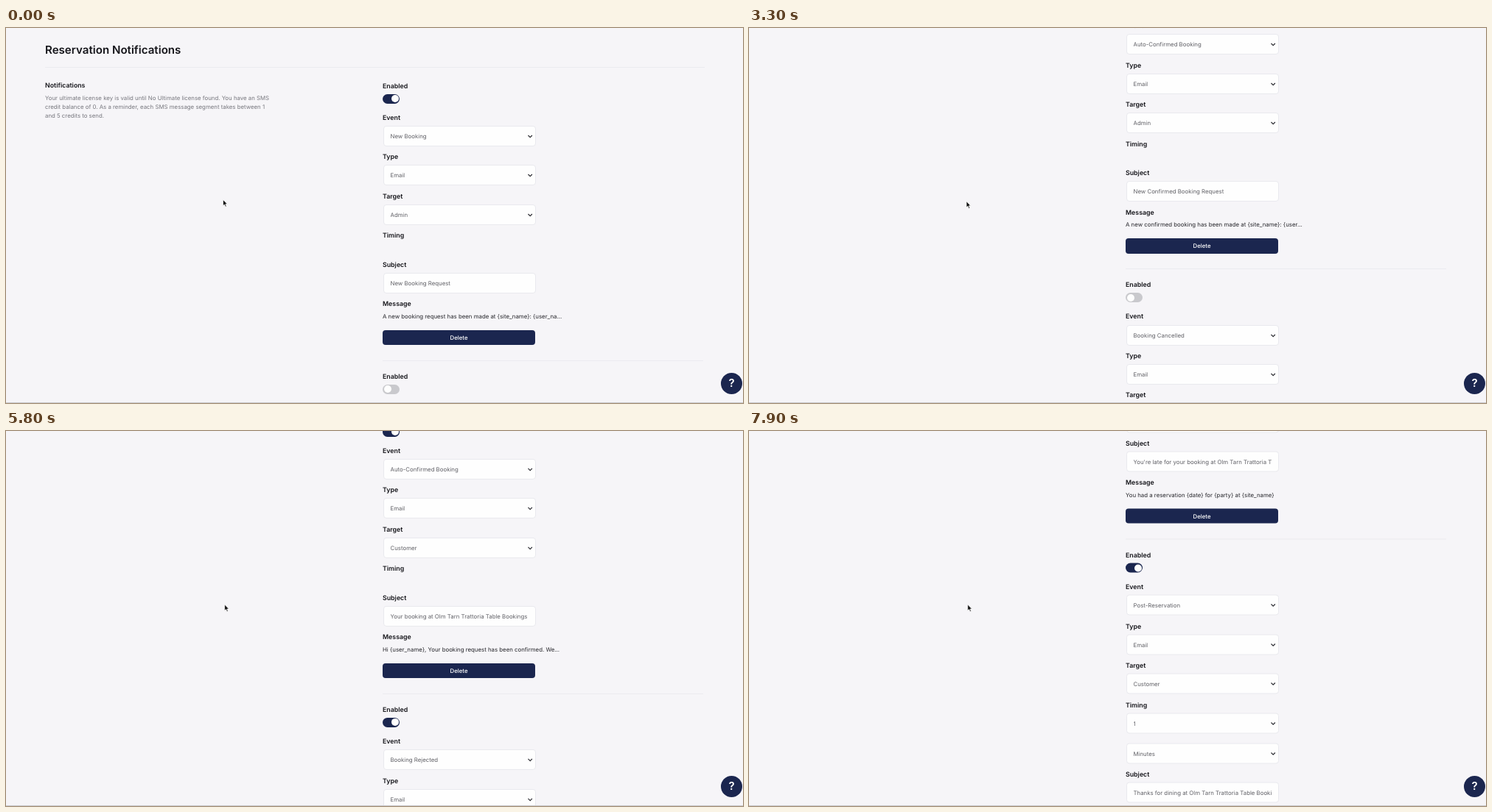
An HTML page for the animation above (8000 ms loop, 1000x510 px).

```html
<!DOCTYPE html>
<html lang="en">
<head>
<meta charset="utf-8">
<title>Notification settings</title>
<style>
  html, body { margin: 0; width: 100%; height: 100%; overflow: hidden; }
  body {
    position: relative; background: #f6f5f8;
    font: 400 7.84px Inter, sans-serif; text-rendering: geometricPrecision;
  }
  #page { position: absolute; left: 0; top: 0; width: 1000px; }
  #page div, #help, #edge, #cursor { position: absolute; box-sizing: border-box; white-space: pre; }
  .title { font-size: 15.1px; font-weight: 600; line-height: 0; color: #15151a; }
  .label { font-size: 8.8px; font-weight: 600; line-height: 0; color: #15151a; margin-top: .7px; }
  .hint { line-height: 0; color: #77777e; }
  .text { line-height: 0; color: #27272c; }
  .rule { height: 1px; background: #ebebf0; }
  .field {
    width: 207px; height: 28px; padding: 0 9px; line-height: 26px; overflow: hidden;
    background: #fefefe; border: 1px solid #e9e9ee; border-radius: 4px; color: #606066;
  }
  .field span { display: block; overflow: hidden; }
  .field svg { position: absolute; left: 194px; top: 10px; }
  .delete {
    width: 207px; height: 20.5px; line-height: 20.5px; border-radius: 4px;
    background: #1b264f; color: #fff; font-weight: 500; text-align: center;
  }
  .toggle { width: 23px; height: 13px; border-radius: 7px; background: #c9c9cd; }
  .toggle i {
    position: absolute; left: 1.5px; top: 1.5px; width: 10px; height: 10px;
    border-radius: 50%; background: #fefefe;
  }
  .toggle.on { background: #1b264f; }
  .toggle.on i { left: 11.5px; }
  #help {
    left: 970px; top: 469px; width: 29px; height: 29px; border-radius: 50%;
    background: #1b264f; color: #fff; font-size: 15px; font-weight: 600;
    line-height: 28.5px; text-align: center;
  }
  #edge { left: 0; top: 509px; width: 1000px; height: 1px; background: #cbcbd0; }
  #cursor { left: 293px; top: 232px; }
</style>
</head>
<body>
<div id="page"></div>
<div id="help">?</div>
<div id="edge"></div>
<svg id="cursor" width="10" height="14" viewBox="0 0 10 14">
  <path d="M1.5 1.5V9.8L3.4 8.1L4.8 11.2L6.2 10.6L4.8 7.6H7.3Z" fill="#111" stroke="#fff" stroke-width=".7"/>
</svg>
<script>
const LOOP = 8000, STEP = 100;
const COL = 511, FIRST = 79, PITCH = 395.4, TIMING = 55;
const page = document.getElementById('page');
const cursor = document.getElementById('cursor');

const place = 'Olm Tarn Trattoria Table Bookings';
const yours = 'Your booking at ' + place;

// enabled, event, target, subject, message, timing
const notices = [
  [1, 'New Booking', 'Admin', 'New Booking Request',
    'A new booking request has been made at {site_name}: {user_na...'],
  [0, 'Auto-Confirmed Booking', 'Admin', 'New Confirmed Booking Request',
    'A new confirmed booking has been made at {site_name}: {user...'],
  [0, 'Booking Cancelled', 'Admin', 'Booking Request Cancelled',
    'A booking request has been cancelled at {site_name}: {user_...'],
  [1, 'New Booking', 'Customer', yours,
    'Thanks {user_name}, Your booking request is waiting to be c...'],
  [1, 'Booking Confirmed', 'Customer', yours,
    'Hi {user_name}, Your booking request has been confirmed. We...'],
  [1, 'Auto-Confirmed Booking', 'Customer', yours,
    'Hi {user_name}, Your booking request has been confirmed. We...'],
  [1, 'Booking Rejected', 'Customer', yours,
    'Hi {user_name}, Sorry, we could not accomodate your booking...'],
  [1, 'Reservation Reminder', 'Customer', 'Reminder: ' + yours,
    'You have a reservation {date} for {party} at {site_name}', ['1', 'Hours']],
  [1, 'Late for Reservation', 'Customer', "You're late for your booking at " + place,
    'You had a reservation {date} for {party} at {site_name}', ['1', 'Minutes']],
  [1, 'Post-Reservation', 'Customer', 'Thanks for dining at ' + place,
    'Thanks for visiting {site_name}, {user_name}', ['1', 'Minutes']]
];

function add(cls, x, y, html = '') {
  const el = document.createElement('div');
  el.className = cls;
  el.style.left = x + 'px';
  el.style.top = y + 'px';
  el.innerHTML = html;
  page.append(el);
  return el;
}

const chevron = '<svg width="8" height="7" viewBox="0 0 8 7">' +
  '<path d="M1.5 2L4.2 4.7L6.9 2" fill="none" stroke="#2e2e34" stroke-width="1.2"/></svg>';
const label = (y, s) => add('label', COL, y, s);
const input = (y, s) => add('field', COL + .5, y - 14, `<span>${s}</span>`);
const select = (y, s) => add('field', COL + .5, y - 14, `<span>${s}</span>${chevron}`);
const rule = (x, y, w) => { add('rule', x, y).style.width = w + 'px'; };

function addNotice(top, [on, event, target, subject, message, timing]) {
  label(top, 'Enabled');
  add(on ? 'toggle on' : 'toggle', COL, top + 10.5, '<i></i>');
  [['Event', event], ['Type', 'Email'], ['Target', target]].forEach(([name, value], i) => {
    label(top + 43 + i * 53.5, name);
    select(top + 67.7 + i * 53.4, value);
  });
  label(top + 203.5, 'Timing');
  let y = top;
  if (timing) {
    select(top + 228, timing[0]);
    select(top + 269.5, timing[1]);
    y += TIMING;
  }
  label(y + 243, 'Subject');
  input(y + 267.5, subject);
  label(y + 296.5, 'Message');
  add('text', COL, y + 312.5, message);
  add('delete', COL, y + 331.7, 'Delete');
  rule(COL, y + 373, 435);
  return y + PITCH;
}

add('title', 53, 29.5, 'Reservation Notifications');
rule(53, 53, 895);
add('label', 53, 78, 'Notifications');
[
  'Your ultimate license key is valid until No Ultimate license found. You have an SMS',
  'credit balance of 0. As a reminder, each SMS message segment takes between 1',
  'and 5 credits to send.'
].forEach((line, i) => add('hint', 53, 94.7 + i * 12.1, line));
notices.reduce(addNotice, FIRST);

// [time, value] points joined by a smooth monotone curve
function curve(points) {
  const slope = i => (points[i + 1][1] - points[i][1]) / (points[i + 1][0] - points[i][0]);
  const last = points.length - 1;
  const tangent = points.map((_, i) => {
    const a = slope(Math.max(i - 1, 0)), b = slope(Math.min(i, last - 1));
    return a * b > 0 ? 2 * a * b / (a + b) : 0;
  });
  return t => {
    if (t <= points[0][0]) return points[0][1];
    if (t >= points[last][0]) return points[last][1];
    const i = points.findIndex(p => p[0] > t) - 1;
    const [t0, v0] = points[i], [t1, v1] = points[i + 1];
    const d = t1 - t0, s = (t - t0) / d, r = 1 - s;
    return v0 * (1 + 2 * s) * r * r + v1 * s * s * (3 - 2 * s)
      + d * s * r * (tangent[i] * r - tangent[i + 1] * s);
  };
}

const scroll = curve([[1400, 0], [2300, 111], [3300, 520], [4400, 1137],
  [5200, 1612], [6400, 2549], [7900, 3578.5]]);
const driftX = curve([[2400, 0], [3300, .5], [4400, 2], [7900, 2.2]]);
const driftY = curve([[2400, 0], [3300, 2.2], [4400, 3], [5200, 2.5], [7900, 2.5]]);

function draw() {
  // the small offset keeps a clock just short of a step from lagging behind
  const t = Math.floor((performance.now() + 2) % LOOP / STEP) * STEP;
  page.style.transform = `translateY(${-scroll(t).toFixed(2)}px)`;
  cursor.style.transform = `translate(${driftX(t).toFixed(2)}px, ${driftY(t).toFixed(2)}px)`;
  requestAnimationFrame(draw);
}
draw();
</script>
</body>
</html>
```
